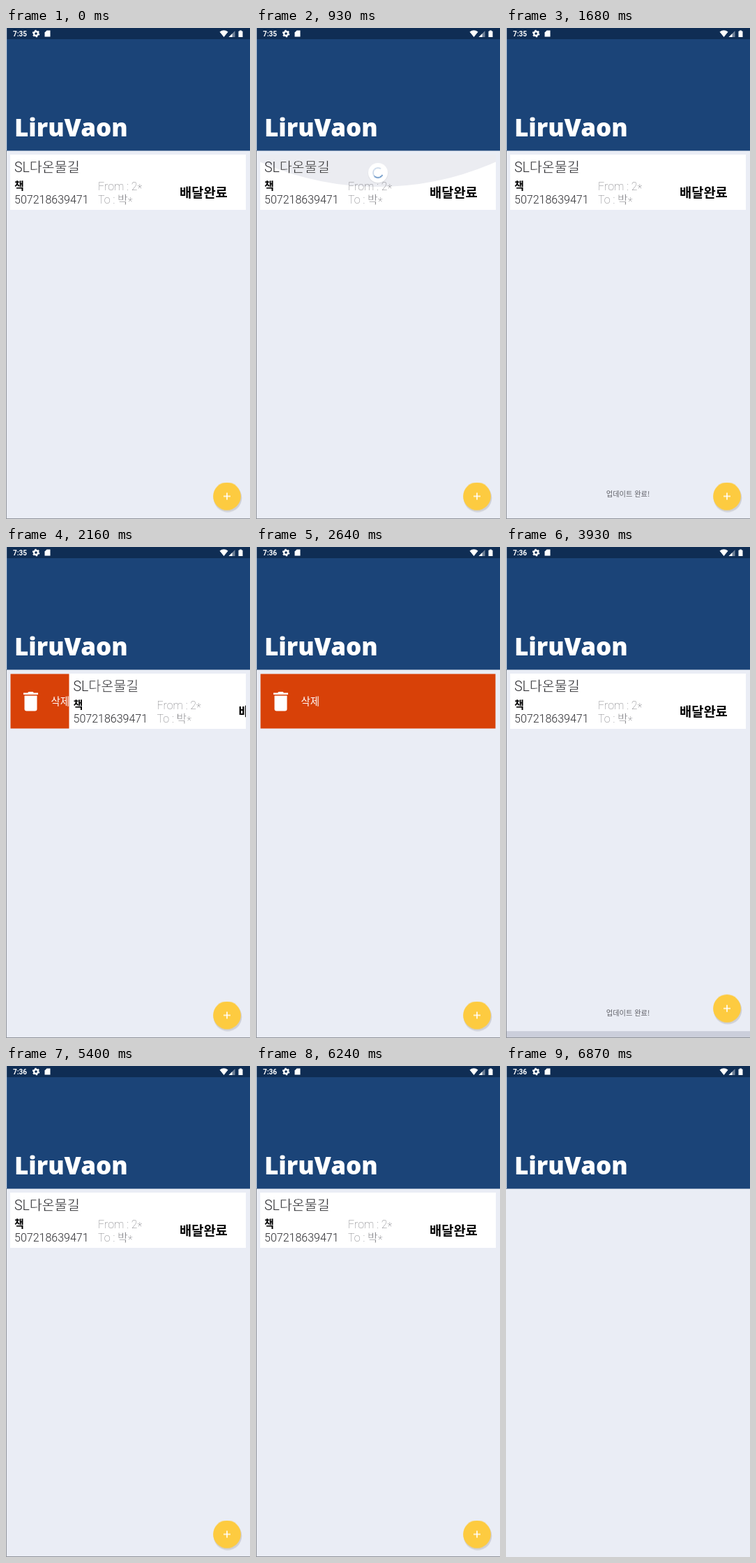
These frames come from a looping animation (350 by 702 pixels, 6.9 s). An HTML page:

```html
<!DOCTYPE html>
<html lang="ko">
<head>
<meta charset="utf-8">
<title>Parcel list</title>
<style>
html, body { margin: 0; width: 100%; height: 100%; overflow: hidden; background: #eaedf5; }
svg { display: block; width: 350px; height: 702px; }
text { font-family: "Noto Sans CJK KR", "Noto Sans CJK", "Noto Sans CJK JP", sans-serif; white-space: pre; }
.brand { font: 800 35px "Open Sans", sans-serif; fill: #fff; }
.clock { font: 700 10px Roboto, sans-serif; fill: #fff; }
.thin, .light { font-family: Roboto, "Noto Sans CJK KR", "Noto Sans CJK", sans-serif; }
.thin { font-size: 16px; font-weight: 100; fill: #77777c; }
.light { font-weight: 300; fill: #2a2a2e; }
.fine { stroke: #fff; stroke-width: .5px; }
.bold { font-weight: 700; fill: #000; }

.anim { animation: 6900ms linear infinite; }
.rim { animation-name: rim; animation-timing-function: step-end; }
.early { animation-name: early; animation-timing-function: step-end; }
.late { animation-name: late; animation-timing-function: step-end; }
.row { animation-name: row; }
.card { animation-name: swipe; }
.glow { animation-name: glow; }
.pull { animation-name: pull; }
.pop { animation-name: pop; }
.toast { animation-name: toast; }
.snack { animation-name: snack; }
.lift { animation-name: lift; }
.leave { animation-name: leave; }
.spin { animation: spin 450ms linear infinite; }

@keyframes rim { 0% { opacity: 1 } 94.5%, 100% { opacity: 0 } }
@keyframes early { 0% { opacity: 1 } 34.8%, 100% { opacity: 0 } }
@keyframes late { 0% { opacity: 0 } 34.8%, 100% { opacity: 1 } }
@keyframes row {
  0%, 39.9% { opacity: 1 }
  40.4%, 50% { opacity: 0 }
  52%, 92.5% { opacity: 1 }
  94.7%, 100% { opacity: 0 }
}
@keyframes swipe {
  0%, 27.2% { transform: translateX(0); animation-timing-function: ease-in-out }
  31.1%, 31.4% { transform: translateX(84.500px); animation-timing-function: ease-in-out }
  35.4%, 45% { transform: translateX(338px) }
  45.1%, 100% { transform: translateX(0) }
}
@keyframes glow {
  0%, 11% { transform: translateY(-54px); animation-timing-function: ease-out }
  12.9%, 14.5% { transform: translateY(0); animation-timing-function: ease-in-out }
  17.4%, 100% { transform: translateY(-54px) }
}
@keyframes pull {
  0%, 10.9% { transform: translateY(-50px); animation-timing-function: ease-out }
  12.6%, 19% { transform: translateY(0) }
  19.1%, 100% { transform: translateY(-50px) }
}
@keyframes pop {
  0%, 17.1% { transform: scale(1) }
  18.1%, 20% { transform: scale(0) }
  20.1%, 100% { transform: scale(1) }
}
@keyframes toast {
  0%, 18% { opacity: 0 }
  19%, 26.6% { opacity: 1 }
  27.6%, 52.6% { opacity: 0 }
  53.8%, 61% { opacity: 1 }
  62%, 100% { opacity: 0 }
}
@keyframes snack {
  0%, 40.3% { transform: translateY(41px); animation-timing-function: ease-out }
  41.5%, 55.9% { transform: translateY(0) }
  56.96% { transform: translateY(31px) }
  57.5%, 100% { transform: translateY(41px) }
}
@keyframes lift {
  0%, 40.3% { transform: translateY(0); animation-timing-function: ease-out }
  41.5%, 55.9% { transform: translateY(-41px) }
  56.96% { transform: translateY(-10px) }
  57.5%, 100% { transform: translateY(0) }
}
@keyframes leave {
  0%, 92.5% { transform: scale(1) }
  94.7%, 100% { transform: scale(0) }
}
@keyframes spin { to { transform: rotate(360deg) } }
</style>
</head>
<body>
<svg viewBox="0 0 350 702">
  <defs>
    <clipPath id="slot"><rect x="6" y="181" width="338" height="79"/></clipPath>
  </defs>
  <rect width="350" height="702" fill="#eaedf5"/>

  <g class="anim row" clip-path="url(#slot)">
    <rect x="6.500" y="181.500" width="337" height="78" fill="#d84108"/>
    <g fill="#fff">
      <path d="M25 208.500h6l1.500-1.500h6l1.500 1.500h6v2.500h-21z"/>
      <path d="M26.500 212.500h18v19q0 3-3 3h-12q-3 0-3-3z"/>
      <text x="64.500" y="226" font-size="14.500">삭제</text>
    </g>
    <g class="anim card">
      <rect x="6" y="181" width="338" height="79" fill="#fff"/>
      <circle class="anim glow" cx="175" cy="-193" r="420" fill="#ebecf1"/>
      <text class="light" x="12" y="205.700" font-size="19.500">SL<tspan class="fine">다온물길</tspan></text>
      <text class="bold" x="12" y="231" font-size="15">책</text>
      <text class="light" x="12" y="250.500" font-size="16">507218639471</text>
      <text class="thin" x="132" y="231.500">From : 2<tspan dy="3">*</tspan></text>
      <text class="thin" x="132" y="250.500">To : <tspan class="fine">박</tspan><tspan dy="3">*</tspan></text>
      <text class="bold" x="249" y="241.500" font-size="18.700">배달완료</text>
    </g>
  </g>

  <g transform="translate(175 207)">
    <g class="anim pull"><g class="anim pop">
      <circle cy="1" r="14.500" fill="#000" opacity=".05"/>
      <circle r="14" fill="#fff"/>
      <g class="spin" fill="none" stroke-width="1.500">
        <circle r="7" stroke="#c3d3e6" stroke-dasharray="34 10"/>
        <circle r="7" stroke="#5f8fc4" stroke-dasharray="14 30"/>
      </g>
    </g></g>
  </g>

  <rect width="350" height="175.500" fill="#1b4478"/>
  <rect width="350" height="16" fill="#0f2d54"/>
  <text class="brand" x="12" y="155">LiruVaon</text>

  <text class="clock anim early" x="10" y="12">7:35</text>
  <text class="clock anim late" x="10" y="12">7:36</text>
  <g fill="#fff">
    <circle cx="43" cy="8" r="3" fill="none" stroke="#fff" stroke-width="2.400"/>
    <circle cx="43" cy="8" r="4.600" fill="none" stroke="#fff" stroke-width="1.400" stroke-dasharray="2.400 2.417"/>
    <path d="M58.500 3.500h5v9h-8v-6z"/>
    <path d="M306.500 5.500q6-4.500 12 0l-6 7.500z"/>
    <path d="M328.500 4v9h-9z" opacity=".4"/>
    <path d="M324.500 8v5h-5z"/>
    <path d="M333.500 4.500h1.500v-1h3v1h1.500v8.500h-6z"/>
  </g>

  <rect class="anim snack" x="0" y="661" width="350" height="41" fill="#cbcedb"/>
  <text class="anim toast" x="175" y="669.700" font-size="10.200" text-anchor="middle" fill="#606168">업데이트 완료!</text>

  <g transform="translate(317 669.500)">
    <g class="anim lift"><g class="anim leave">
      <circle cx="1" cy="2.300" r="20.300" fill="#cfd0d6"/>
      <circle r="19.900" fill="#fdcb40"/>
      <path d="M-5 0H5M0-5V5" stroke="#fff" stroke-width="1.600"/>
    </g></g>
  </g>

  <g class="anim rim">
    <path d="M.5 175V702" stroke="#92959c"/>
    <path d="M0 701.500H350" stroke="#92959c"/>
  </g>
  <path d="M.5 0V175" stroke="#d5d9e2" stroke-width="1.300"/>
</svg>
</body>
</html>
```
